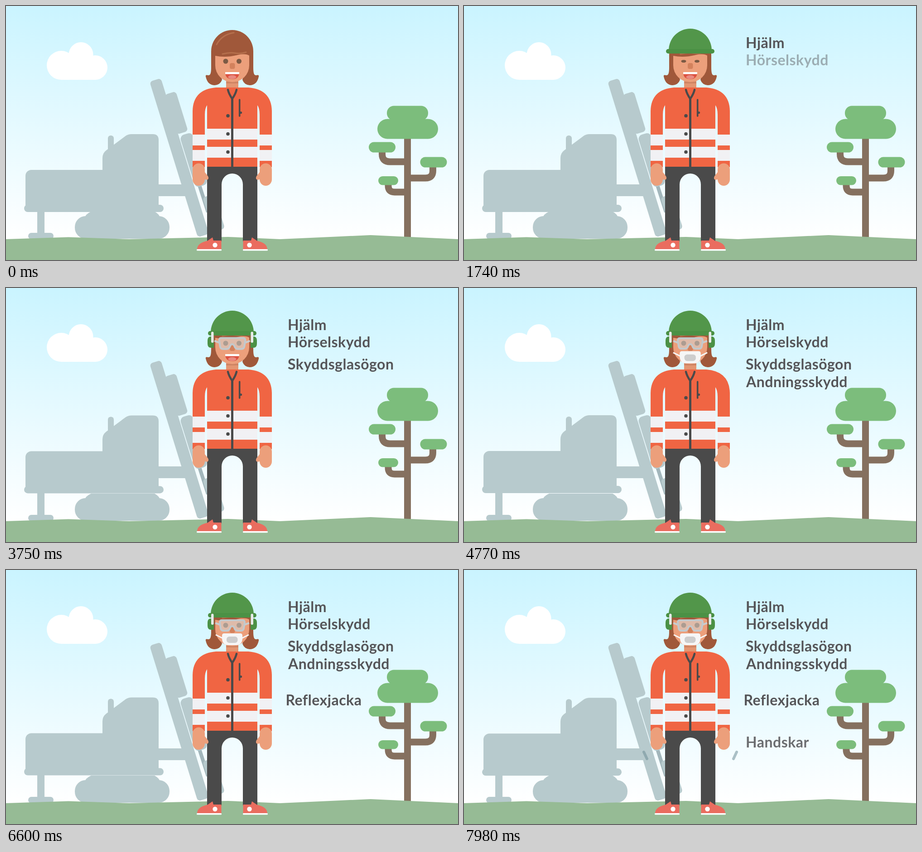
An HTML page that plays this animation: 998 by 561 pixels, repeating every 8000 ms.

```html
<!DOCTYPE html>
<html lang="sv">
<head>
<meta charset="utf-8">
<title>Skyddsutrustning</title>
<style>
  html, body { margin: 0; width: 100%; height: 100%; overflow: hidden; }
  svg { display: block; width: 100%; height: 100%; }
  text { font: 700 32px Lato, "Open Sans", sans-serif; letter-spacing: .5px; fill: #555558; }
</style>
</head>
<body>
<svg viewBox="0 0 998 561">
  <defs>
    <linearGradient id="sky" x2="0" y2="1">
      <stop stop-color="#caf4ff"/>
      <stop offset=".92" stop-color="#fff"/>
    </linearGradient>
    <radialGradient id="shine">
      <stop stop-color="#fff" stop-opacity=".32"/>
      <stop offset=".5" stop-color="#fff" stop-opacity=".22"/>
      <stop offset="1" stop-color="#fff" stop-opacity="0"/>
    </radialGradient>
  </defs>
  <rect width="998" height="561" fill="url(#sky)"/>

  <g fill="#fff">
    <circle cx="122" cy="131" r="32"/>
    <circle cx="165.500" cy="107" r="27"/>
    <circle cx="197" cy="136" r="27"/>
    <path d="M122 115H197V163H122z"/>
  </g>

  <g id="machine" fill="#b7cacd">
    <rect x="337" y="394" width="65" height="26"/>
    <path d="M427 396L446 455" stroke="#a2b6bb" stroke-width="8"/>
    <rect width="26" height="360" rx="7" transform="translate(317 167) rotate(-17.200)"/>
    <rect width="26" height="92" rx="7" transform="translate(350 196) rotate(-17.200)"/>
    <rect width="29" height="120" rx="10" transform="translate(383 287) rotate(-17.200)"/>
    <rect width="27" height="80" rx="7" transform="translate(434 423) rotate(-17.200)"/>
    <rect x="69" y="445" width="16" height="62"/>
    <rect x="49" y="501" width="56" height="14" rx="7"/>
    <rect x="152" y="464" width="209" height="50" rx="24"/>
    <path d="M174 468Q175 460 188 454H328Q339 460 340 468z"/>
    <g id="engine">
      <rect x="43" y="362" width="190" height="90" rx="13"/>
      <rect x="40" y="439" width="308" height="16" rx="8"/>
      <rect x="225" y="286" width="13" height="50" rx="6"/>
      <path d="M213 445V336Q213 325 221 319L264 287Q270 283 277 283H324Q337 283 337 296V445z"/>
    </g>
  </g>

  <g fill="none" stroke="#85705f" stroke-width="15">
    <path d="M886.500 285V512M830.500 318V327Q830.500 344 848 344H886M942.500 350V364Q942.500 380 926 380H886M844 390V397Q844 411 858 411H886"/>
  </g>
  <g fill="#7cbd7c">
    <rect x="841" y="220.500" width="91" height="32" rx="15.500"/>
    <rect x="820" y="249.500" width="134" height="44" rx="22"/>
    <rect x="801" y="300.500" width="59" height="23" rx="11.500"/>
    <rect x="914.500" y="333.500" width="59" height="23" rx="11.500"/>
    <rect x="822" y="376" width="44" height="19.500" rx="9.700"/>
  </g>
  <path fill="#96bb95" d="M0 515L138 510.500 272 515 490 510 605 515 805 506 998 515V561H0z"/>

  <!-- Head -->
  <g id="curl" fill="#a0583a">
    <path d="M453 135C453 150 451 155 444 152.500Q440 152 441 156Q445 175 461 175Q473 174 477 163L470 135z"/>
  </g>
  <use href="#curl" transform="matrix(-1 0 0 1 999 0)"/>
  <path fill="#a0583a" d="M453 145V100A46.500 47 0 0 1 546 100V145z"/>
  <path fill="#e39672" d="M486 160H513V181H486z"/>
  <path fill="#cf8463" d="M486 167H513V171H486z"/>
  <path fill="#ec9f7b" d="M462 100H537V131A37.500 37 0 0 1 462 131z"/>
  <path fill="#a0583a" d="M460 95H539V111Q531 104 512 108Q485 115 462 110z"/>
  <g fill="none" stroke="#b56f4c" stroke-width="3" stroke-linecap="round">
    <path d="M465 85Q477 63 503 59M478 106Q494 102 506 104T530 102"/>
  </g>
  <g id="eyes" fill="#7b5a44">
    <circle cx="485" cy="122" r="5.500"/>
    <circle cx="514.500" cy="122" r="5.500"/>
  </g>
  <rect x="494" y="126" width="11.500" height="13" rx="4" fill="#d3825d"/>
  <path fill="#dc5140" d="M484 148H515Q514 161.500 499.500 161.500T484 148z"/>
  <ellipse cx="499.500" cy="157" rx="9" ry="4.200" fill="#e98a80"/>
  <rect x="484" y="146" width="31" height="4.500" rx="1" fill="#fff"/>

  <!-- Body; sleeve, hand and shoe are mirrored to the right -->
  <path fill="#4a4a4a" d="M444 352H555V520H523V394a23.500 24 0 0 0-47 0V520H444z"/>
  <path fill="#f06543" d="M444 219V355H555V219L560 195 534 180H464L440 195z"/>
  <path fill="#f1f1f4" d="M444 271H555V295H444zM444 311H555V335H444z"/>
  <g id="side">
    <path fill="#f06543" d="M412 356V232Q413 184 464 180H480V219H444Q439 226 439 240V356z"/>
    <path fill="#f1f1f4" d="M412 284H439V308H412zM412 318H439V342H412z"/>
    <path fill="#ec9f7b" d="M412 361a13.500 13.500 0 0 1 27 0V367L446 376Q449 382 444 384L439 383a13.500 14 0 0 1-27 0z"/>
    <path fill="#ea6d5f" d="M422 538C422 525 435 521 445 518.500L456 511 458 518H475.500V538z"/>
    <rect x="421" y="537" width="55" height="3.500" rx="1.500" fill="#fff"/>
    <circle cx="461.500" cy="528" r="5.200" fill="#fff"/>
  </g>
  <use href="#side" transform="matrix(-1 0 0 1 999 0)"/>
  <g fill="none" stroke="#4a4a4a" stroke-width="5">
    <path d="M499.500 203V355"/>
    <path d="M490 185Q492 194 499.500 205Q507 194 509 185" stroke-width="4.500" stroke-linecap="round"/>
    <path d="M515.700 207V243" stroke-width="3.600" stroke-linecap="round"/>
  </g>
  <g fill="#4a4a4a">
    <circle cx="518.500" cy="235.500" r="2.600"/>
    <circle cx="490" cy="242.500" r="3.800"/>
    <circle cx="490" cy="282.500" r="3.800"/>
    <circle cx="490" cy="322.500" r="3.800"/>
  </g>

  <!-- Equipment -->
  <g id="goggles">
    <path d="M462 117L473 121M537 117L526 121" stroke="#c9cccd" stroke-width="4"/>
    <path fill="#d5d3cf" fill-opacity=".55" stroke="#c3c9cc" stroke-width="4" d="M476 111H523Q527 111 527 116L525 129Q524 134 519 134H511Q507 134 505 130Q503 124 499.500 124T494 130Q492 134 488 134H480Q475 134 474 129L472 116Q472 111 476 111z"/>
  </g>
  <g id="mask">
    <path d="M463 143L479 151M536 143L520 151" stroke="#f6f6f6" stroke-width="3"/>
    <path fill="#f6f6f6" d="M482 140H517Q522 140 522 145V152Q521 166 508 166H491Q478 166 477 152V145Q477 140 482 140z"/>
    <rect x="487" y="147" width="24.500" height="14" rx="6" fill="#cdcdcd"/>
  </g>
  <g id="helmet">
    <path fill="#52964a" d="M452 98A47.500 48 0 0 1 547 98z"/>
    <rect x="446" y="95" width="107" height="10" rx="5" fill="#4b9145"/>
  </g>
  <g id="ear">
    <path fill="#4b9145" d="M459 107V132H453Q445 132 445 123V116Q445 107 453 107z"/>
    <rect x="453" y="96.500" width="5.500" height="24.500" rx="2.700" fill="#e9ebea"/>
  </g>
  <use href="#ear" transform="matrix(-1 0 0 1 999 0)"/>

  <ellipse id="glow" cx="499.500" cy="300" rx="170" ry="200" fill="url(#shine)"/>
  <g id="marks" stroke="#6f8f98" stroke-width="6">
    <path d="M397 402L404 417M602 402L595 417" stroke-linecap="round"/>
  </g>
  <g id="labels"></g>
</svg>
<script>
  const LOOP = 8000;
  const byId = id => document.getElementById(id);
  const ramp = (t, start, length) => Math.min(1, Math.max(0, (t - start) / length));
  const smooth = p => p * p * (3 - 2 * p);
  const easeOut = p => 1 - (1 - p) ** 3;
  const backOut = p => 1 + 2.7 * (p - 1) ** 3 + 1.7 * (p - 1) ** 2;
  const bump = (t, centre, half) => Math.max(0, 1 - Math.abs(t - centre) / half);

  // text, x, baseline, fade start
  const labels = [
    ["Hjälm", 622, 93, 250],
    ["Hörselskydd", 622, 130.500, 1470],
    ["Skyddsglasögon", 622, 180, 2660],
    ["Andningsskydd", 623, 218.500, 3950],
    ["Reflexjacka", 617.500, 298.500, 5760],
    ["Handskar", 622, 391.500, 7470]
  ].map(([words, x, y, start]) => {
    const node = document.createElementNS("http://www.w3.org/2000/svg", "text");
    node.textContent = words;
    node.setAttribute("x", x);
    node.setAttribute("y", y);
    byId("labels").append(node);
    return { node, start };
  });

  // time, vertical drift of the engine
  const drift = [[0, 0], [1740, 0], [2820, -1.2], [4770, -2], [6060, -1.5], [6960, -1.5], [8000, -.7]];

  function engineOffset(t) {
    const i = drift.findIndex(([time]) => time > t);
    const [t0, y0] = drift[i - 1], [t1, y1] = drift[i];
    return y0 + (y1 - y0) * smooth(ramp(t, t0, t1 - t0));
  }

  function place(id, transform, opacity = 1) {
    byId(id).setAttribute("transform", transform);
    byId(id).setAttribute("opacity", opacity);
  }

  const scaleAt = (x, y, sx, sy = sx) => `translate(${x} ${y}) scale(${sx} ${sy}) translate(${-x} ${-y})`;

  function pop(id, t, start, x, y) {
    const p = ramp(t, start, 500);
    place(id, scaleAt(x, y, backOut(p)), ramp(p, 0, .3));
  }

  function draw(t) {
    place("engine", `translate(0 ${engineOffset(t)})`);
    place("eyes", scaleAt(499.5, 122, 1, 1 - .9 * bump(t, 1690, 100)));

    const drop = ramp(t, 860, 450);
    place("helmet", `translate(0 ${-38 * (1 - easeOut(drop))})`, ramp(drop, 0, .5));
    const slide = ramp(t, 1880, 400);
    place("ear", `translate(${-22 * (1 - easeOut(slide))} 0)`, ramp(slide, 0, .5));
    pop("goggles", t, 3350, 499.5, 122);
    pop("mask", t, 4350, 499.5, 154);

    byId("glow").setAttribute("opacity", smooth(bump(t, 6930, 330)));
    byId("marks").setAttribute("opacity", .55 * ramp(t, 7900, 70));
    for (const { node, start } of labels) node.setAttribute("opacity", ramp(t, start, 600));
  }

  function tick(now) {
    draw(now % LOOP);
    requestAnimationFrame(tick);
  }
  draw(0);
  requestAnimationFrame(tick);
</script>
</body>
</html>
```
